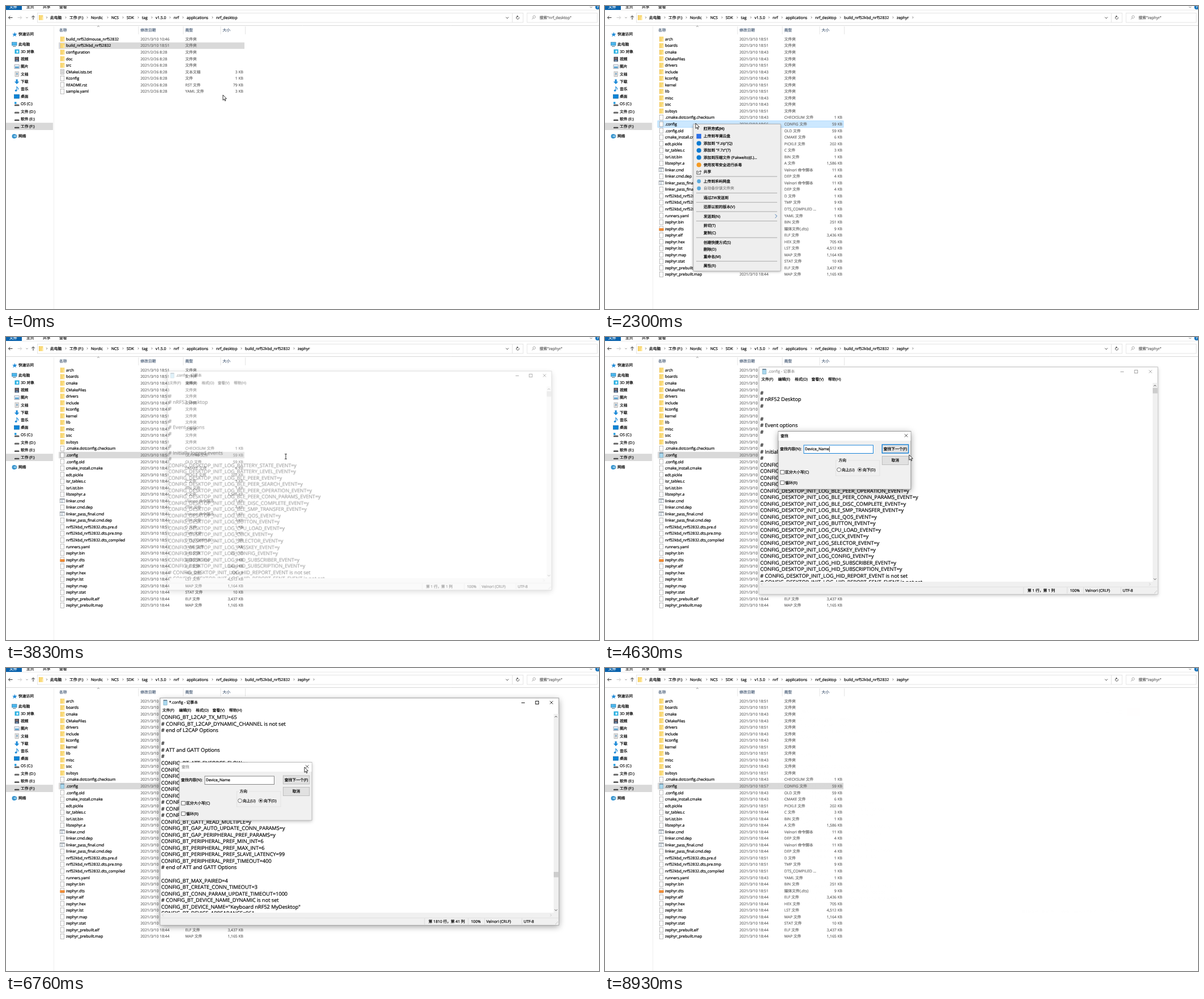
An HTML page with a canvas for the animation above (9000 ms loop, 1047x535 px).

```html
<!DOCTYPE html>
<html lang="zh">
<head>
<meta charset="utf-8">
<style>
html, body { margin: 0; width: 100%; height: 100%; overflow: hidden; background: #fff; }
canvas { display: block; width: 1047px; height: 535px; }
</style>
</head>
<body>
<canvas id="stage" width="1047" height="535"></canvas>
<script>
const W = 1047, H = 535, LOOP = 9000, ROW = 11.54, LINE = 11.53, UI = 6.78, MONO = 9.15;
const FONT = '"Open Sans", "Noto Sans CJK SC", "Noto Sans CJK JP", "Noto Sans CJK", sans-serif';
const stage = document.getElementById('stage').getContext('2d');
const layer = document.createElement('canvas');
layer.width = W; layer.height = H;
const layerCtx = layer.getContext('2d');
let c = stage;

// Time marks of the story, in ms
const OPEN1 = 520, OPEN2 = 1230, SELECT = 1950, MENU = 2030, CHOOSER = 2780, CHOSEN = 3640,
  PAD_OPEN = 3765, FIND = 4130, TYPE = 4250, HIT1 = 5040, HIT2 = 5600, EDIT = 6400,
  FIND_END = 6990, SAVED = 7600, REFRESH = 8000, PAD_CLOSE = 8740, BLUR = 8850;

const cursorPath = [
  [0, 383, 157], [70, 383, 157], [420, 165, 67], [640, 165, 67], [940, 160, 123], [1320, 160, 123],
  [1880, 160, 207], [2350, 160, 207], [2600, 188, 214], [2840, 188, 214], [3420, 494, 211],
  [4080, 494, 211], [4560, 537, 208], [4650, 537, 208], [4980, 513, 199], [6020, 513, 199],
  [6330, 452, 420], [6580, 452, 420], [6750, 527, 175], [6800, 527, 175], [6930, 531, 173],
  [7100, 531, 173], [7800, 700, 250], [8400, 965, 60]];

const folders = [
  { depth: 10, name: 'nrf_desktop', files: `build_nrf52dmouse_nrf52832|3/10 10:46
build_nrf52kbd_nrf52832|3/10 18:51
configuration|2/26 8:28
doc|2/26 8:28
src|2/26 8:28
CMakeLists.txt|2/26 8:28|3
Kconfig|2/26 8:28|1
README.rst|2/26 8:28|79
sample.yaml|2/26 8:28|3` },
  { depth: 11, name: 'build_nrf52kbd_nrf52832', files: `app|44
CMakeFiles|51
Kconfig|43
modules|43
Output|44
src|43
zephyr|51
.ninja_deps|43|1
.ninja_log|51|1
build.emProject|51|1,474
build.ninja|51|1,261
cmake_install.cmake|43|3
CMakeCache.txt|51|25
nrf_desktop.emProject|51|4
nrf_desktop.emSession|51|8
rules.ninja|51|29
zephyr_modules.txt|51|3
zephyr_settings.txt|51|1` },
  { depth: 12, name: 'zephyr', files: `arch|51
boards|51
cmake|43
CMakeFiles|43
drivers|51
include|43
kconfig|43
kernel|51
lib|51
misc|43
soc|43
subsys|51
.cmake.dotconfig.checksum|43|1
.config|56|59
.config.old|43|59
cmake_install.cmake|43|6
edt.pickle|51|202
isr_tables.c|44|3
isrList.bin|44|1
libzephyr.a|44|1,586
linker.cmd|44|11
linker.cmd.dep|44|4
linker_pass_final.cmd|44|11
linker_pass_final.cmd.dep|44|4
nrf52kbd_nrf52832.dts.pre.d|51|1
nrf52kbd_nrf52832.dts.pre.tmp|51|9
nrf52kbd_nrf52832.dts_compiled|51|1
runners.yaml|43|1
zephyr.bin|44|251
zephyr.dts|51|9
zephyr.elf|44|3,436
zephyr.hex|44|705
zephyr.lst|44|4,512
zephyr.map|44|1,164
zephyr.stat|44|10
zephyr_prebuilt.elf|44|3,437
zephyr_prebuilt.map|44|1,165` }
];
for (const f of folders) f.rows = f.files.split('\n').map(s => s.split('|'));

const crumbs = ['此电脑', '工作 (F:)', 'Nordic', 'NCS', 'SDK', 'tag', 'v1.5.0', 'nrf', 'applications',
  'nrf_desktop', 'build_nrf52kbd_nrf52832', 'zephyr'];
const crumbX = [78, 112, 150, 186, 213, 240, 264, 296, 319, 371, 422, 515, 550];

const logged = ('BATTERY_STATE BATTERY_LEVEL BLE_PEER BLE_PEER_SEARCH BLE_PEER_OPERATION ' +
  'BLE_PEER_CONN_PARAMS BLE_DISC_COMPLETE BLE_SMP_TRANSFER BLE_QOS BUTTON CPU_LOAD CLICK SELECTOR ' +
  'PASSKEY CONFIG HID_SUBSCRIBER HID_SUBSCRIPTION').split(' ');
const topText = ['', '#', '# nRF52 Desktop', '#', '', '#', '# Event options', '#', '', '#',
  '# Initially logged events', '#', ...logged.map(n => `CONFIG_DESKTOP_INIT_LOG_${n}_EVENT=y`),
  ...['REPORT', 'REPORT_SENT'].map(n => `# CONFIG_DESKTOP_INIT_LOG_HID_${n}_EVENT is not set`)];
const deepText = `~L2CAP_RX_MTU=65
~L2CAP_TX_MTU=65
# ~L2CAP_DYNAMIC_CHANNEL is not set
# end of L2CAP Options

#
# ATT and GATT Options
#
~ATT_ENFORCE_FLOW=y
~ATT_PREPARE_COUNT=0
~ATT_TX_MAX=2
~GATT_SERVICE_CHANGED=y
~GATT_CACHING=y
~GATT_CLIENT=y
# ~GATT_DYNAMIC_DB is not set
# ~GATT_NOTIFY_MULTIPLE is not set
# ~GATT_ENFORCE_SUB is not set
~GATT_READ_MULTIPLE=y
~GAP_AUTO_UPDATE_CONN_PARAMS=y
~GAP_PERIPHERAL_PREF_PARAMS=y
~PERIPHERAL_PREF_MIN_INT=6
~PERIPHERAL_PREF_MAX_INT=6
~PERIPHERAL_PREF_SLAVE_LATENCY=99
~PERIPHERAL_PREF_TIMEOUT=400
# end of ATT and GATT Options

~MAX_PAIRED=4
~CREATE_CONN_TIMEOUT=3
~CONN_PARAM_UPDATE_TIMEOUT=1000
# ~DEVICE_NAME_DYNAMIC is not set
~DEVICE_NAME="Keyboard nRF52 Desktop"
~DEVICE_APPEARANCE=961`.replaceAll('~', 'CONFIG_BT_').split('\n');

const clamp = v => Math.max(0, Math.min(1, v));
const smooth = v => v * v * (3 - 2 * v);

function text(s, x, y, color = '#000', size = UI, align = 'left', weight = '') {
  c.font = `${weight} ${size}px ${FONT}`;
  c.textAlign = align;
  c.fillStyle = c.strokeStyle = color;
  c.lineWidth = 0.2;
  c.fillText(s, x, y + size * 0.36);
  c.strokeText(s, x, y + size * 0.36);
}
function rect(x, y, w, h, fill, stroke, lw = 0.7) {
  if (fill) { c.fillStyle = fill; c.fillRect(x, y, w, h); }
  if (stroke) { c.strokeStyle = stroke; c.lineWidth = lw; c.strokeRect(x, y, w, h); }
}
function line(color, lw, ...p) {
  c.strokeStyle = color; c.lineWidth = lw;
  c.beginPath();
  for (let i = 0; i < p.length; i += 2) c.lineTo(p[i], p[i + 1]);
  c.stroke();
}
function poly(fill, ...p) {
  c.fillStyle = fill;
  c.beginPath();
  for (let i = 0; i < p.length; i += 2) c.lineTo(p[i], p[i + 1]);
  c.closePath();
  c.fill();
}
function disc(x, y, r, fill, stroke) {
  c.beginPath(); c.arc(x, y, r, 0, 7);
  if (fill) { c.fillStyle = fill; c.fill(); }
  if (stroke) { c.strokeStyle = stroke; c.lineWidth = 0.7; c.stroke(); }
}
function chevron(x, y, dx, dy, color = '#555', lw = 0.8) {
  if (dx) line(color, lw, x - dx, y - 2 * Math.abs(dx), x + dx, y, x - dx, y + 2 * Math.abs(dx));
  else line(color, lw, x - 2 * Math.abs(dy), y - dy, x, y + dy, x + 2 * Math.abs(dy), y - dy);
}
function cross(x, y, color, r = 2.7) {
  line(color, 0.8, x - r, y - r, x + r, y + r);
  line(color, 0.8, x - r, y + r, x + r, y - r);
}
function panel(x, y, w, h, fill, border, blur, depth = 0.4) {
  c.save();
  c.shadowColor = `rgba(0,0,0,${depth})`; c.shadowBlur = blur; c.shadowOffsetY = blur / 4;
  rect(x, y, w, h, fill);
  c.restore();
  rect(x, y, w, h, null, border);
}
function windowFrame(x, y, w, h, fill, focus) {
  if (focus) panel(x, y, w, h, fill, '#777', 11);
  else panel(x, y, w, h, fill, '#aaa', 6, 0.25);
}

function folderIcon(x, y) {
  rect(x, y - 4.4, 7.4, 8.8, '#f9d978');
  rect(x + 5.4, y - 1, 2.2, 5.4, '#ffe9a6');
  rect(x, y - 4.4, 1, 8.8, '#efc457');
}
function pageIcon(x, y, ext) {
  if (ext === 'cmd') {
    rect(x - 0.6, y - 3.6, 8.4, 7, '#fff', '#8a929a');
    rect(x - 0.6, y - 3.6, 8.4, 1.5, '#8a929a');
    disc(x + 3, y + 1, 1.6, null, '#7c95ab');
    return;
  }
  const pad = ext === 'pad';
  rect(x + 0.5, y - 4.3, 6.4, 8.6, pad ? '#a9d8ee' : '#fff', pad ? '#6c9db5' : '#8c8c8c', 0.6);
  if (ext === 'txt') for (let i = 0; i < 5; i++) line('#999', 0.6, x + 1.5, y - 2.8 + i * 1.4, x + 6, y - 2.8 + i * 1.4);
  if (ext === 'dts') rect(x - 0.5, y - 0.8, 8.4, 4.4, '#f08a32');
  if (pad) rect(x + 0.5, y - 4.5, 6.4, 1.4, '#678');
}
function fileType(name, size) {
  if (!size) return '文件夹';
  const dot = name.lastIndexOf('.'), ext = name.slice(dot + 1);
  if (dot < 0) return '文件';
  const special = { txt: '文本文档', cmd: 'Velnori 命令脚本', dts: '媒体文件(.dts)', dts_compiled: 'DTS_COMPILED ...' };
  return special[ext] || ext.toUpperCase() + ' 文件';
}

const places = ['3D 对象', '视频', '图片', '文档', '下载', '音乐', '桌面', 'OS (C:)', '文件 (D:)', '软件 (E:)', '工作 (F:)'];
function sidebar() {
  const blue = '#1f8bd8';
  rect(0, 206.2, 83, 12.8, '#d9d9d9');
  line('#f0f0f0', 1, 84.5, 36, 84.5, H);
  poly(blue, 15.5, 46, 16.6, 49, 19.6, 49, 17.2, 51, 18, 54, 15.5, 52.2, 12, 54, 13.6, 51, 11.2, 49, 14.4, 49);
  text('快速访问', 22, 49.7);
  rect(10.5, 64, 8.5, 5.6, '#4db8ee', '#2878a8');
  line('#48738c', 1, 12, 71.5, 17.5, 71.5);
  text('此电脑', 22, 67.5);
  places.forEach((label, i) => {
    const y = 80.6 + i * 13.2;
    if (i === 0) { rect(15.5, y - 4, 8, 7.5, '#27aee0'); rect(18.5, y - 2, 3, 4, '#e5f8ff'); }
    if (i === 1) { rect(15.5, y - 4, 7.5, 8.4, '#3c4250'); rect(17, y - 3, 4.5, 3, '#8b6d68'); rect(17, y + 1, 4.5, 3, '#6d87a8'); }
    if (i === 2) { rect(15, y - 3.2, 8.6, 6.6, '#e8f3fa', '#889'); rect(16, y, 6.6, 2.4, '#4b98c9'); }
    if (i === 3) { pageIcon(15.5, y, 'txt'); rect(18, y - 1.5, 3, 2, '#75a9cf'); }
    if (i === 4) poly(blue, 17.5, y - 4, 20.7, y - 4, 20.7, y, 23.4, y, 19.1, y + 4.5, 14.8, y, 17.5, y);
    if (i === 5) { disc(17.6, y + 2.6, 1.8, blue); line(blue, 1.1, 19, y + 2.5, 19, y - 4, 21.8, y - 1, 21.5, y + 1); }
    if (i === 6) rect(14.5, y - 3.5, 9, 6.8, '#0a84d8', '#0b67a8');
    if (i > 6) {
      poly('#bbb', 16, y, 22.4, y, 23.3, y + 1.5, 15, y + 1.5);
      rect(15, y + 1.4, 8.4, 2, '#444');
    }
    if (i === 7) rect(15, y - 3.6, 3.4, 3.4, '#1f9be0');
    text(label, 26, y);
  });
  disc(14.5, 230, 4, '#3a9ad6');
  rect(13, 228, 6, 3.8, '#8ed0f3', '#2373a8');
  text('网络', 22, 230);
}

function topBar(folder, lastChevron) {
  rect(0, 0, 28, 7, '#0a63ad');
  text('文件', 6, 1.4, '#fff');
  ['主页', '共享', '查看'].forEach((s, i) => text(s, 36 + i * 29, 1.4, '#333'));
  line('#e3e3e3', 0.8, 28, 7.2, W, 7.2);
  chevron(1033, 2, 0, 1, '#777');
  disc(1044.5, 2, 4, '#1272bd');
  text('?', 1044.5, 1.5, '#fff', 6, 'center');
  line('#333', 1, 11.5, 20.5, 5, 20.5); chevron(5.8, 20.5, -1.4, 0, '#333', 1);
  line('#c8c8c8', 1, 20.5, 20.5, 27, 20.5); chevron(26.4, 20.5, 1.4, 0, '#c8c8c8', 1);
  chevron(37, 20.5, 0, 0.8, '#777');
  line('#333', 1, 48, 24, 48, 17.5); chevron(48, 18.6, 0, -1.4, '#333', 1);
  rect(55.5, 12.5, 857.5, 16.5, '#fff', '#d9d9d9');
  line('#d9d9d9', 0.8, 894, 12.5, 894, 29);
  rect(920, 12.5, 124, 16.5, '#fff', '#d9d9d9');
  folderIcon(58, 20.5);
  chevron(72, 20.3, 0.8, 0);
  for (let i = 0; i < folder.depth; i++) {
    text(crumbs[i], crumbX[i], 20.3);
    if (i < folder.depth - 1 || lastChevron) chevron(crumbX[i + 1] - 6.5, 20.3, 0.8, 0);
  }
  chevron(885, 20.8, 0, 1.2, '#444', 0.9);
  c.strokeStyle = '#444'; c.lineWidth = 0.9;
  c.beginPath(); c.arc(903.5, 20.7, 2.5, -0.4, 4.4); c.stroke();
  poly('#444', 902, 16.7, 905, 18.2, 902.4, 20);
  disc(932.5, 19.3, 2.2, null, '#888');
  line('#888', 0.8, 931, 21, 928.7, 23.5);
  text(`搜索"${folder.name}"`, 942, 20.3, '#666');
  line('#d8d8d8', 1, 0, 34.5, W, 34.5);
}

function explorer(t, pos) {
  const level = t < OPEN1 ? 0 : t < OPEN2 ? 1 : 2;
  const folder = folders[level];
  topBar(folder, level === 1 || level === 2 && (t < CHOOSER || t > 4000 && t < BLUR));
  sidebar();
  chevron(163, 36, 0, -0.9, '#777');
  [['名称', 94], ['修改日期', 237.5], ['类型', 316.5], ['大小', 382.5]].forEach(([s, x]) => text(s, x, 42.2, '#4c607a'));
  for (const x of [234, 313, 379, 422.5]) line('#e2e2e2', 0.9, x, 36, x, 50);

  const selected = level === 0 ? 1 : level === 2 && t >= SELECT ? 13 : -1;
  const active = level === 0 ? t > 420 : t < CHOOSER || t >= PAD_CLOSE && t < BLUR;
  const over = t < SELECT && pos.x > 93 && pos.x < 421 ? Math.round((pos.y - 58.5) / ROW) : -1;
  folder.rows.forEach(([name, stamp, size], i) => {
    const y = 58.5 + i * ROW;
    if (i === selected) rect(93, y - 5.7, 328, 11.4, active ? '#cce8ff' : '#d9d9d9', active ? '#99d1ff' : null);
    else if (i === over) rect(93, y - 5.7, 328, 11.4, '#e5f3ff');
    const config = name === '.config';
    if (size) pageIcon(95.8, y, config && t > 3990 ? 'pad' : name.split('.').pop());
    else folderIcon(96, y);
    if (config && t > REFRESH) stamp = '57';
    text(name, 106, y);
    text('2021/' + (stamp.length > 2 ? stamp : '3/10 18:' + stamp), 237.5, y, '#6d6d6d');
    text(fileType(name, size), 316.5, y, '#6d6d6d');
    if (size) text(size + ' KB', 419, y, '#6d6d6d', UI, 'right');
  });
}

const menuItems = [
  [217, '打开方式(H)'], [230, '上传到岑澜云盘', '#2c6fe8'], [242.5, '添加到 "F.zip"(Q)', '#0b7ad1'],
  [255, '添加到 "F.7z"(7)', '#0b7ad1'], [267.5, '添加到压缩文件 (Pakwelto)(L)...', '#0b7ad1'],
  [280.5, '使用炭苇安全进行杀毒', '#f59a23'], [293, '共享'], [309.5, '上传到禾屿网盘', '#5aa9dc'],
  [322, '自动备份该文件夹', '#5aa9dc'], [338.5, '通过ZW发送到'], [355, '还原以前的版本(V)'], [371.3, '发送到(N)'],
  [388, '剪切(T)'], [400.7, '复制(C)'], [417.2, '创建快捷方式(S)'], [430, '删除(D)'], [442.5, '重命名(M)'], [459, '属性(R)']];
function contextMenu(pos) {
  panel(156, 208.5, 154, 259.5, '#eee', '#a5a5a5', 5);
  menuItems.forEach(([y, label, mark], i) => {
    if (Math.abs(pos.y - y) < 6 && pos.x > 164) rect(157.5, y - 6.2, 151, 12.4, '#fff');
    if (i === 1) rect(161.5, y - 4.2, 8.4, 8.4, mark);
    else if (mark) disc(165.8, y, i > 6 ? 3.4 : 4.1, mark);
    text(label, 174, y, i === 8 ? '#888' : '#000', UI, 'left', i ? '' : 'bold');
  });
  line('#333', 0.8, 164, 291.5, 162, 291.5, 162, 297, 168.5, 297, 168.5, 295);
  line('#333', 0.8, 163.8, 295, 165.5, 292, 169.5, 292);
  chevron(169, 292, 1, 0, '#333');
  for (const y of [301, 330.2, 346.7, 363, 379.7, 409, 450.7]) line('#999', 0.8, 161, y, 304, y);
  chevron(302, 371, 1.6, 0, '#2463a8', 0.9);
}

function chooser(t, pos) {
  c.globalAlpha = clamp((t - CHOOSER) / 100) * clamp((CHOSEN + 90 - t) / 90);
  panel(417, 150, 212, 242, '#fff', '#0078d7', 7);
  text('你要如何打开这个文件?', 430, 168, '#111', 10);
  [['记事本', 211, '#79bfe0'], ['写字板', 236, '#4b7fc0'], ['在商店中查找应用', 261, '#0078d7'], ['更多应用', 288]].forEach(([s, y, icon]) => {
    if (Math.abs(pos.y - y) < 12 && pos.x > 417) rect(418, y - 12, 210, 24, '#dbeaf7');
    if (icon) rect(430, y - 8, 16, 16, icon);
    text(s, icon ? 453 : 430, y, icon ? '#111' : '#0067b8', 7.6);
  });
  text('其他选项', 430, 192, '#666');
  rect(430, 338, 7, 7, '#fff', '#333');
  text('始终使用此应用打开 .config 文件', 442, 341.5);
  rect(560, 362, 56, 17, '#ccc');
  text('确定', 588, 370.5, '#111', 7, 'center');
  c.globalAlpha = 1;
}

function editor(t, typed) {
  const deep = t >= HIT1, first = t >= HIT2 ? 1 : 0;
  const lines = deep ? deepText.slice(first, first + 31) : topText;
  c.save();
  c.beginPath(); c.rect(273, 81, 694, 351); c.clip();
  lines.forEach((s, i) => {
    const y = 87 + i * LINE;
    if (s.includes('DEVICE_NAME=')) s = s.replace('Desktop', typed + 'Desktop');
    text(s, 274, y, '#000', MONO);
    if (deep && i === 29) {
      const x = 274 + c.measureText(s.slice(0, s.indexOf('DEVICE_NAME'))).width;
      if (t < EDIT) {
        rect(x, y - 5.7, c.measureText('DEVICE_NAME').width, 11.4, '#0078d7');
        text('DEVICE_NAME', x, y, '#fff', MONO);
      } else if (t < 6600) {
        const end = 274 + c.measureText(s.slice(0, 38 + typed.length)).width;
        line('#000', 0.7, end, y - 5, end, y + 5);
      }
    }
  });
  c.restore();
}

function notepad(t, pos) {
  const focus = t < FIND || t >= EDIT, ink = focus ? '#000' : '#999';
  const typed = 'My'.slice(0, (t > 6470) + (t > 6550));
  windowFrame(272, 53, 704, 401, '#fff', focus);
  pageIcon(277.5, 61, 'pad');
  text((typed && t < SAVED ? '*' : '') + '.config - 记事本', 288, 61, ink);
  const hot = t > FIND_END && pos.x > 951 && pos.y < 69;
  if (hot) rect(951, 53.5, 24.6, 15.5, '#e81123');
  line(ink, 0.9, 910, 61.5, 916, 61.5);
  rect(935, 58.4, 5.4, 5.4, null, ink, 0.9);
  cross(963, 61, hot ? '#fff' : ink);
  ['文件(F)', '编辑(E)', '格式(O)', '查看(V)', '帮助(H)'].forEach((s, i) => text(s, 276 + i * 29.5, 75));
  editor(t, typed);
  rect(967, 81, 8.6, 351, '#f0f0f0');
  rect(272.5, 432, 703, 21.6, '#f0f0f0');
  line('#dcdcdc', 0.7, 272, 441.3, 976, 441.3);
  rect(967, t < HIT1 ? 90 : 360, 8.6, 9.5, '#cdcdcd');
  chevron(971, 86, 0, -1.1, '#444', 0.9);
  chevron(971, 427.5, 0, 1.1, '#444', 0.9);
  chevron(277, 436.5, -1, 0, '#bbb');
  chevron(962, 436.5, 1, 0, '#bbb');
  for (const x of [739, 816, 845, 911]) line('#d0d0d0', 0.7, x, 442, x, 453);
  text(t < EDIT ? '第 1 行，第 1 列' : `第 1810 行，第 ${39 + typed.length} 列`, 746, 447.5);
  text('100%', 821, 447.5);
  text('Velnori (CRLF)', 848, 447.5);
  text('UTF-8', 914, 447.5);
  for (let i = 0; i < 3; i++) rect(973.5 - i * 1.7, 448 + i * 1.7, 1, 1, '#aaa');
}

function findDialog(t) {
  const focus = t < EDIT;
  windowFrame(306, 166.5, 234, 102.5, '#f0f0f0', focus);
  rect(306.4, 167, 233.2, 16, '#fff');
  text('查找', 310, 174.5, focus ? '#000' : '#999');
  cross(531.7, 174, '#222');
  text('查找内容(N):', 309, 197.3);
  rect(351, 191, 122.5, 14.5, '#fff', focus ? '#0078d7' : '#7a7a7a', 0.9);
  const typed = 'Device_Name'.slice(0, Math.ceil(clamp((t - TYPE) / 280) * 11));
  text(typed, 353, 197.8);
  if (t < 4800) {
    const x = 353.5 + c.measureText(typed).width;
    line('#000', 0.7, x, 193, x, 203);
  }
  const pressed = focus && (t > HIT1 - 90 && t < HIT1 + 60 || t > HIT2 - 50 && t < HIT2 + 90);
  rect(489.3, 190, 46.5, 15, pressed ? '#cce4f7' : '#e1e1e1', focus ? '#0078d7' : '#adadad', focus ? 1.3 : 0.7);
  rect(489.3, 210.5, 46.5, 15, '#e1e1e1', '#adadad');
  text('查找下一个(F)', 512.5, 197.3, '#000', UI, 'center');
  text('取消', 512.5, 217.8, '#000', UI, 'center');
  rect(407.5, 218, 77.5, 27, null, '#dcdcdc');
  rect(411, 214, 17, 8, '#f0f0f0');
  text('方向', 412.5, 218);
  disc(413, 234.3, 3.4, '#fff', '#333');
  disc(449.7, 234.3, 3.4, '#fff', '#333');
  disc(449.7, 234.3, 1.8, '#222');
  text('向上(U)', 418, 234.3);
  text('向下(D)', 455, 234.3);
  rect(309.8, 235.4, 6.6, 6.6, '#fff', '#333');
  rect(309.8, 254, 6.6, 6.6, '#fff', '#333');
  text('区分大小写(C)', 318, 238.8);
  text('循环(R)', 318, 257.4);
}

function cursorAt(t) {
  let i = 0;
  while (i < cursorPath.length - 1 && cursorPath[i + 1][0] <= t) i++;
  const a = cursorPath[i], b = cursorPath[i + 1] || a;
  const k = b === a ? 0 : smooth((t - a[0]) / (b[0] - a[0]));
  return { x: a[1] + (b[1] - a[1]) * k, y: a[2] + (b[2] - a[2]) * k };
}
function pointer(t, { x, y }) {
  if (t >= BLUR) return;
  const inText = x > 273 && x < 967 && y > 81 && y < 432;
  const inFind = t >= FIND && t < FIND_END && x > 306 && x < 540 && y > 166 && y < 269;
  if (t > PAD_OPEN && inText && !inFind) {
    line('#222', 0.9, x, y - 4, x, y + 4);
    for (const d of [-4.3, 4.3]) line('#222', 0.9, x - 2, y + d, x + 2, y + d);
    return;
  }
  c.save();
  c.translate(x, y);
  c.beginPath();
  const p = [0, 0, 0, 9.3, 2.1, 7.4, 3.6, 10.6, 5, 10, 3.5, 6.9, 6.4, 6.7];
  for (let i = 0; i < p.length; i += 2) c.lineTo(p[i], p[i + 1]);
  c.closePath();
  c.fillStyle = '#fff'; c.fill();
  c.strokeStyle = '#000'; c.lineWidth = 0.8; c.stroke();
  c.restore();
}

function draw(t) {
  const pos = cursorAt(t);
  c = stage;
  rect(0, 0, W, H, '#fff');
  explorer(t, pos);
  if (t >= MENU && t < 2710) contextMenu(pos);
  if (t >= CHOOSER && t < CHOSEN + 90) chooser(t, pos);
  if (t >= PAD_OPEN && t < PAD_CLOSE + 195) {
    const shown = clamp((t - PAD_OPEN) / 180) * (1 - clamp((t - PAD_CLOSE) / 192));
    c = layerCtx;
    c.clearRect(0, 0, W, H);
    notepad(t, pos);
    c = stage;
    const scale = 1 - 0.09 * (1 - shown) ** 2;
    c.save();
    c.globalAlpha = shown;
    c.translate(624, 253.5);
    c.scale(scale, scale);
    c.drawImage(layer, -624, -253.5);
    c.restore();
  }
  if (t >= FIND && t < FIND_END) findDialog(t);
  pointer(t, pos);
}

for (const g of [stage, layerCtx]) {
  g.textRendering = 'geometricPrecision';
  g.fontKerning = 'none';
}
const start = performance.now();
function tick() {
  draw((performance.now() - start) % LOOP);
  requestAnimationFrame(tick);
}
tick();
</script>
</body>
</html>
```
